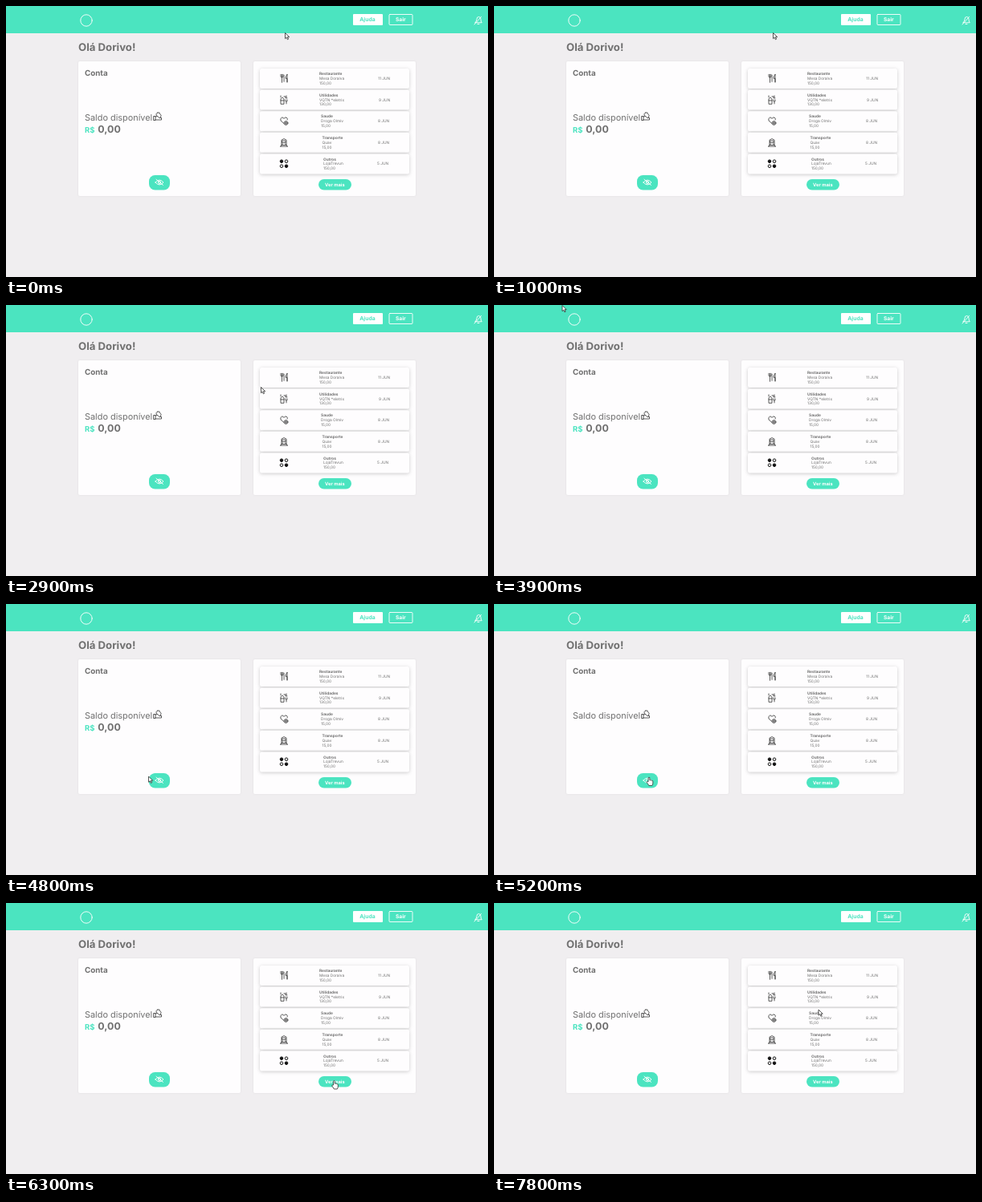
Animation, 600 px wide and 338 px high, one loop 8 s. Source, as an HTML page:

```html
<!DOCTYPE html>
<html lang="pt-BR">
<head>
<meta charset="utf-8">
<title>Conta</title>
<style>
  html, body { margin: 0; width: 100%; height: 100%; overflow: hidden; background: #f0eef0 }
  svg { display: block; width: 600px; height: 338px; text-rendering: geometricPrecision }
  text { font-family: Inter, sans-serif; fill: #707070 }
  .bold { font-weight: 700 }
  .teal { fill: #4be4c0 }
  .white { fill: #fff }
  .card { fill: #fefdfe; filter: drop-shadow(0 0 1px #0001) }
  .row { fill: #fefdfe; filter: drop-shadow(0 1.5px 2px #0003) }
  .small { font-size: 4.8px }
  .line { fill: none; stroke: #333; stroke-width: .8; stroke-linecap: round; stroke-linejoin: round }
  .light { stroke: #fff; stroke-width: .9 }
  .cursor { fill: #fff; stroke: #222; stroke-width: .75; stroke-linejoin: round }
</style>
</head>
<body>
<svg viewBox="0 0 600 338">
  <rect class="teal" width="600" height="34"/>
  <circle class="line light" cx="100" cy="18" r="7.2"/>
  <rect class="white" x="432" y="10" width="37" height="14" rx="1"/>
  <text class="bold teal" x="440.3" y="19.4" font-size="6.8">Ajuda</text>
  <rect class="line light" x="477" y="10.5" width="29" height="13" rx="1"/>
  <text class="bold white" x="485" y="19.3" font-size="6.6">Sair</text>
  <path class="line light" d="M584 20.5q2-1 2-4q0-3 2.5-3t2.5 3q0 3 1 4zM587 22.5h2M583 23l8.5-9.5"/>

  <text class="bold" x="90" y="56" font-size="13.2">Olá Dorivo!</text>

  <rect class="card" x="90" y="69" width="202" height="168" rx="2"/>
  <text class="bold" x="98" y="86.7" font-size="9.8">Conta</text>
  <text x="98" y="143" font-size="10.9">Saldo disponível</text>
  <path class="line" d="M184 137.5h2v5h-2zM186 138l3-.5 1.5 2h3v2.5h-7.5M187.5 137q-1.5-3 1-3.5q-1-1 .5-.5h1.5q1-.5 .5.8q3.5 2.5 1.5 5"/>
  <g id="balance">
    <text class="bold teal" x="98" y="157.5" font-size="9.5">R$</text>
    <text class="bold" x="114.3" y="157.7" font-size="12.4">0,00</text>
  </g>
  <rect class="teal" x="178" y="211" width="26" height="18.5" rx="7.5"/>
  <path class="line light" d="M186 220q5-6 10 0q-5 6-10 0z"/>
  <circle class="line light" cx="191" cy="220" r="1.6"/>
  <path id="slash" class="line light" d="M187 216.2l8.5 7.2"/>

  <rect class="card" x="308" y="69" width="202" height="168" rx="2"/>
  <g id="rows"></g>
  <rect class="teal" x="389" y="216" width="41" height="13.5" rx="6.7"/>
  <text class="bold white" x="397" y="224.7" font-size="5.8">Ver mais</text>

  <path id="arrow" class="cursor" d="M0 0v7.2l1.7-1.5 1.2 2.6 1.2-.6-1.2-2.5h2.3z"/>
  <path id="hand" class="cursor" d="M-.9 5.5V.7q.9-1.3 1.8 0v3q1-.6 1.5.3q1-.5 1.4.4q1-.2 1 .8v2.3q0 1.5-1 3h-4q-1-2-2.7-4q0-1.3 2-1z"/>
</svg>
<script>
const el = id => document.getElementById(id);

// label, payee, amount, date, text x, date x, icon centred on (0, 0)
const entries = [
  ['Restaurante', 'Mesa Doralva', '150,00', '11 JUN', 390, 463,
    '<path class="line" stroke-width="1" d="M-4-5v3q1.500 2 3 0v-3M-2.500-5V5M0-4v8M4-5q-2 2-2 5h2V5V-5"/>'],
  ['Utilidades', 'VQTN *eletrix', '130,00', '9 JUN', 390, 464,
    '<path class="line" d="M-4 5v-6l2-2 2 2v6zM-4 1h4M-4-5v2M0-4h2v2h2M3-5v2M2 0v2q1 1 2 0v-2M3 3v2"/>'],
  ['Saude', 'Droga Olmiv', '15,00', '8 JUN', 392, 463,
    '<path class="line" d="M0 3l-4-3.500q-1-3 1.500-4q2 0 2.500 1.500q1-2 3-1.500q2 1 1.200 3"/><circle class="line" cx="2.500" cy="2.500" r="2.400"/><path class="line" d="M1 2.500h3M2.500 1v3"/>'],
  ['Transporte', 'Quav', '15,00', '8 JUN', 393.5, 463,
    '<path class="line" d="M-3 3v-6q3-3 6 0v6zM-2-2h4v2.500h-4zM-2 2h.5M1.500 2h.5M-4.500 5h9M-3 3l-1 2M3 3l1 2"/>'],
  ['Outros', 'LojaTrevun', '150,00', '5 JUN', 395, 462,
    [[-3, -3, 1], [3, -3, 0], [-3, 3, 0], [3, 3, 1]].map(([x, y, full]) =>
      `<circle cx="${x}" cy="${y}" r="1.8" stroke="#111" fill="${full ? '#111' : '#fff'}"/>`).join('')]
];
el('rows').innerHTML = entries.map(([label, payee, amount, date, x, dateX, icon], i) => `
  <g transform="translate(0 ${78 + i * 26.6})">
    <rect class="row" x="316" width="186" height="25" rx="2.5"/>
    <g transform="translate(346 12.3)">${icon}</g>
    <text class="small bold" x="${x}" y="8.3">${label}</text>
    <text class="small" x="${x}" y="14.1">${payee}</text>
    <text class="small" x="${x}" y="19.8">${amount}</text>
    <text class="small" x="${dateX}" y="14">${date}</text>
  </g>`).join('');

// time, x, y of the pointer tip
const path = [
  [0, 347.5, 33.5], [1500, 347.5, 33.5], [1900, 376, 55], [2400, 405, 95],
  [3400, 230, 110], [3500, 230, 110], [3900, 85, .5], [4400, 115, 105],
  [4800, 177.5, 215], [5100, 193, 216], [5500, 193, 216], [6300, 408.5, 221.5],
  [7100, 408.5, 221.5], [7400, 404, 133], [8000, 404, 133]
];
const buttons = [[432, 10, 37, 14], [477, 10, 29, 14], [178, 211, 26, 18.5], [389, 216, 41, 13.5]];

function pointerAt(t) {
  const i = path.findIndex(p => p[0] > t);
  const [t0, x0, y0] = path[i - 1], [t1, x1, y1] = path[i];
  const k = (t - t0) / (t1 - t0);
  return [x0 + (x1 - x0) * k, y0 + (y1 - y0) * k];
}

const show = (id, on) => el(id).setAttribute('visibility', on ? 'visible' : 'hidden');

function draw() {
  const t = Math.floor(performance.now() % 8000 / 100) * 100;
  const [x, y] = pointerAt(t);
  const over = buttons.some(([bx, by, w, h]) => x >= bx && x <= bx + w && y >= by && y <= by + h);
  const hidden = t >= 5200 && t < 5500;
  for (const id of ['arrow', 'hand']) el(id).setAttribute('transform', `translate(${x} ${y})`);
  show('arrow', !over);
  show('hand', over);
  show('balance', !hidden);
  show('slash', !hidden);
  requestAnimationFrame(draw);
}
draw();
</script>
</body>
</html>
```
